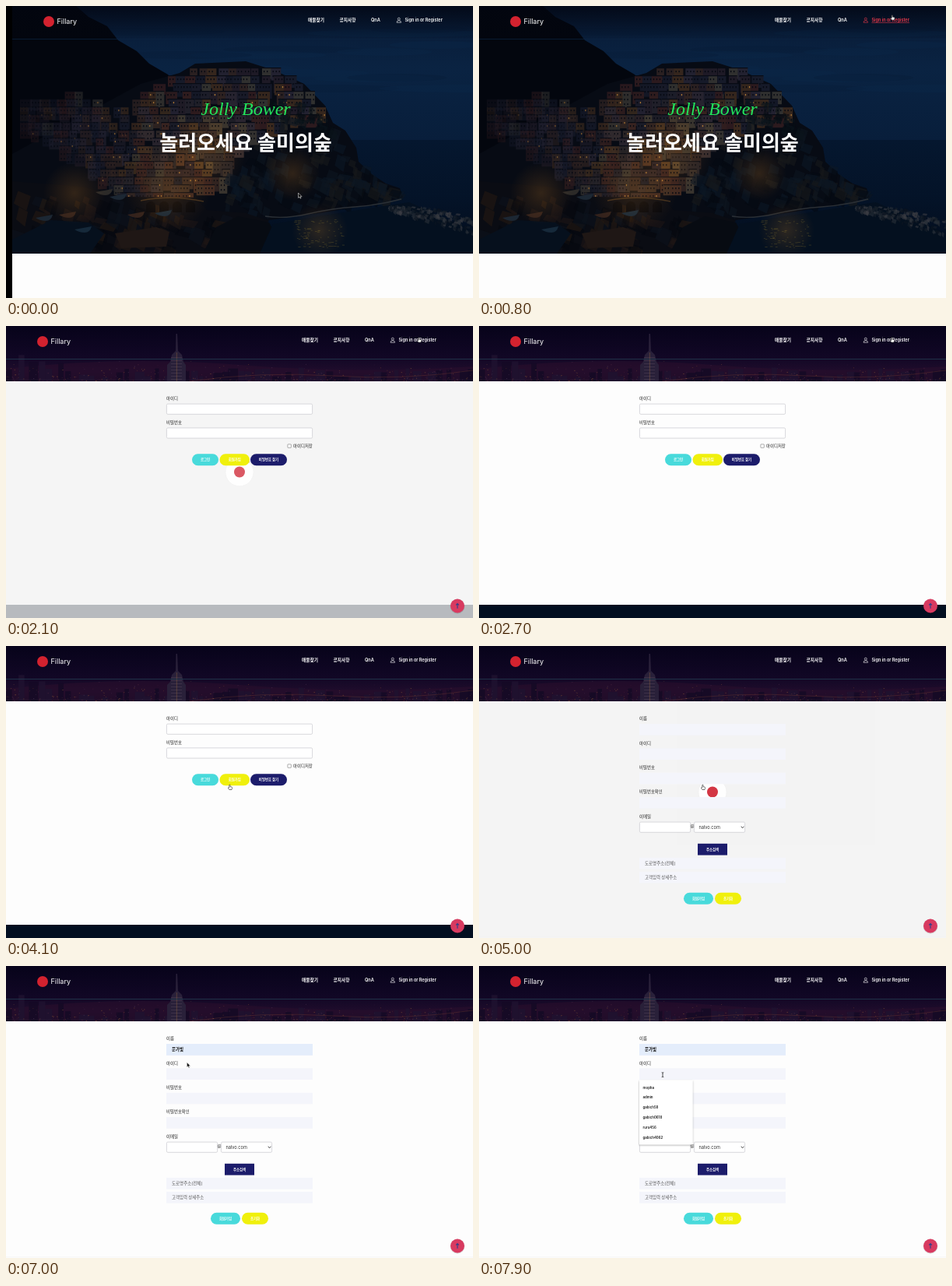
Write an HTML page that moves like this. It is 600x375 px and loops after 8000 ms.

```html
<!DOCTYPE html>
<html lang="ko">
<head>
<meta charset="utf-8">
<style>
html, body { margin: 0; width: 100%; height: 100%; overflow: hidden; background: #000; }
svg { display: block; width: 100%; height: 100%; }
text { font-family: Inter, "Noto Sans CJK KR", "Noto Sans CJK", sans-serif; white-space: pre; }
</style>
</head>
<body>
<svg id="stage" viewBox="0 0 600 375" preserveAspectRatio="none"></svg>
<script>
const LOOP = 8000;
const stage = document.getElementById('stage');

// Markup helpers
const rect = (x, y, w, h, fill, more = '') =>
  `<rect x="${x}" y="${y}" width="${w}" height="${h}" fill="${fill}" ${more}/>`;
const circle = (x, y, r, fill, more = '') => `<circle cx="${x}" cy="${y}" r="${r}" fill="${fill}" ${more}/>`;
const path = (d, fill, more = '') => `<path d="${d}" fill="${fill}" ${more}/>`;
const text = (x, y, size, fill, str, weight = 500, more = '') =>
  `<text x="${x}" y="${y}" font-size="${size}" fill="${fill}" font-weight="${weight}" ${more}>${str}</text>`;
const group = (id, inner, more = '') => `<g id="${id}" ${more}>${inner}</g>`;
const mid = 'text-anchor="middle"';

function seeded(s) {
  return () => {
    s = (s + 0x6D2B79F5) | 0;
    let v = Math.imul(s ^ (s >>> 15), 1 | s);
    v = (v + Math.imul(v ^ (v >>> 7), 61 | v)) ^ v;
    return ((v ^ (v >>> 14)) >>> 0) / 4294967296;
  };
}

// Height of a polyline at x
function along(pts, x) {
  for (let i = 1; i < pts.length; i++) {
    const [x0, y0] = pts[i - 1], [x1, y1] = pts[i];
    if (x <= x1) return y0 + (y1 - y0) * (x - x0) / (x1 - x0);
  }
  return pts[pts.length - 1][1];
}

const defs = `<defs>
<linearGradient id="sky" x1="0" y1="0" x2="0" y2="1">
  <stop offset="0" stop-color="#081a35"/><stop offset=".25" stop-color="#0a2342"/><stop offset=".54" stop-color="#081e3b"/><stop offset="1" stop-color="#06162d"/></linearGradient>
<linearGradient id="sea" x1="0" y1="0" x2="0" y2="1">
  <stop offset="0" stop-color="#05172f"/><stop offset=".5" stop-color="#041328"/><stop offset="1" stop-color="#030d1d"/></linearGradient>
<linearGradient id="shade" x1="0" y1="0" x2="0" y2="1">
  <stop offset="0" stop-color="#02050f" stop-opacity=".75"/><stop offset="1" stop-color="#02050f" stop-opacity="0"/></linearGradient>
<radialGradient id="lamp"><stop offset="0" stop-color="#c07a28" stop-opacity=".22"/>
  <stop offset="1" stop-color="#b0661c" stop-opacity="0"/></radialGradient>
<linearGradient id="night" x1="0" y1="0" x2="0" y2="1">
  <stop offset="0" stop-color="#07031a"/><stop offset=".55" stop-color="#110725"/><stop offset=".8" stop-color="#1e0c2b"/><stop offset="1" stop-color="#150a24"/></linearGradient>
<clipPath id="heroClip"><rect width="600" height="318"/></clipPath>
<clipPath id="headClip"><rect width="600" height="71"/></clipPath>
<filter id="drop" x="-10%" y="-10%" width="120%" height="125%">
  <feDropShadow dx="0" dy="1" stdDeviation="1" flood-opacity=".35"/></filter>
</defs>`;

// Houses are brightest around the lamplit square and fade into the dark hill
function village() {
  const rnd = seeded(41);
  const top = [[8, 118], [80, 108], [140, 128], [168, 98], [215, 84], [235, 72], [300, 70], [335, 80], [372, 98], [398, 128]];
  const low = [[8, 150], [90, 205], [140, 245], [225, 250], [265, 222], [300, 165], [398, 134]];
  const walls = ['#1e1a26', '#2a2021', '#161a29', '#35261d', '#222130', '#131726', '#2c1a1e', '#30302f'];
  let out = '';
  for (let y = 70; y < 250; y += 10) {
    for (let x = 10; x < 394; x += 9 + rnd() * 6) {
      const w = 9 + rnd() * 7, h = 13 + rnd() * 9;
      const color = walls[Math.floor(rnd() * walls.length)];
      if (y < along(top, x) || y > along(low, x) || rnd() < 0.12) continue;
      const glow = Math.max(0, 1 - Math.hypot(x - 235, (y - 195) * 1.3) / 130);
      const dim = Math.min(1, .3 + x / 300);
      let house = rect(x.toFixed(1), y, w.toFixed(1), h.toFixed(1), color) +
        rect(x.toFixed(1), y, w.toFixed(1), h.toFixed(1), '#7a5428', `opacity="${(glow * .55 * rnd()).toFixed(2)}"`) +
        rect(x.toFixed(1), y - 1, w.toFixed(1), 1.2, '#080b14');
      for (let k = 2; k < w - 2; k += 4)
        for (let j = 3; j < h - 4; j += 6)
          house += rect((x + k).toFixed(1), y + j, 1.3, 2.2, rnd() < .05 ? '#a87535' : '#060912');
      out += `<g opacity="${dim.toFixed(2)}">${house}</g>`;
    }
  }
  return out;
}

// Scattered facets between two outlines
function rocks(rnd, count, top, low, colors, size) {
  const x0 = top[0][0], span = top[top.length - 1][0] - x0;
  let out = '';
  for (let i = 0; i < count; i++) {
    const x = x0 + rnd() * span, a = along(top, x), y = a + rnd() * (along(low, x) - a);
    const w = size * (.4 + rnd()), h = size * (.5 + rnd());
    out += path(`M${x.toFixed(1)} ${y.toFixed(1)}l${w.toFixed(1)} ${(h / 3).toFixed(1)}l${(-w / 3).toFixed(1)} ${h.toFixed(1)}l${(-w).toFixed(1)} ${(-h / 2).toFixed(1)}z`,
      colors[i % colors.length], 'opacity=".6"');
  }
  return out;
}

function heroPhoto() {
  const rnd = seeded(7);
  let out = rect(0, 0, 600, 318, 'url(#sky)') + rect(280, 172, 320, 146, 'url(#sea)');
  // Long soft clouds
  for (let i = 0; i < 16; i++)
    out += `<ellipse cx="${(150 + rnd() * 450).toFixed(0)}" cy="${(25 + rnd() * 130).toFixed(0)}" rx="${(50 + rnd() * 70).toFixed(0)}" ry="5" fill="${i % 2 ? '#0d294b' : '#071b36'}" opacity=".3"/>`;
  out += path('M0 0H82L98 14L122 26L136 44L160 58L176 74L200 88L240 130V318H0Z', '#03060e');
  out += path('M0 190L165 100L215 86L235 74L300 71L335 82L375 100L402 128L412 150L428 160L442 182L445 200L462 216L480 228L498 234L502 246L470 254L400 265L330 275L270 318H0Z', '#070b14');
  out += village();
  // Rock faces of the headland
  out += rocks(rnd, 130, [[275, 215], [310, 180], [345, 135], [400, 140], [440, 195], [490, 236]],
    [[275, 262], [340, 258], [420, 246], [490, 242]], ['#0d1620', '#050a13', '#17191b', '#0b1724'], 12);
  out += rocks(rnd, 40, [[325, 112], [370, 118], [410, 150]], [[325, 135], [380, 150], [410, 165]], ['#0a141b', '#060d14'], 8);
  // Harbour and foreground
  out += path('M0 225L90 232L140 245L236 246L250 262L300 266L330 276L290 318H0Z', '#0a0c13');
  out += rocks(rnd, 110, [[0, 228], [140, 246], [250, 264], [335, 276]], [[0, 300], [140, 312], [335, 305]],
    ['#05080f', '#1c1615', '#0b121d', '#231913'], 14);
  for (let i = 0; i < 4; i++) out += path(`M${172 + i * 17} 265v-8a6 6 0 0 1 12 0v8z`, '#04060c');
  out += path('M165 250Q205 242 246 251', 'none', 'stroke="#3f2e1d" stroke-width="1.5"');
  out += path('M0 300L50 275L98 278L118 292L100 318H0Z', '#06101d');
  out += path('M245 318L262 284L290 270L330 278L352 318Z', '#070b12');
  out += path('M318 318L335 280L400 269L470 258L510 252L600 292V318Z', '#04101f');
  out += path('M325 270Q350 274 380 267T440 258T500 248', 'none', 'stroke="#2a2f35" stroke-width="1.3"');
  out += path('M132 292L185 284L202 290L198 309L140 311Z', '#1f1715');
  // Boats
  const boats = [[30, 272], [60, 268], [80, 287], [107, 239], [125, 245], [148, 268], [183, 266]];
  boats.forEach(([x, y], i) => {
    out += path(`M${x} ${y}l22 -4q-2 8 -9 8t-13 -4z`, ['#1c2733', '#33221c', '#16293a', '#2c2a28'][i % 4]);
  });
  // Breakwater stones
  out += rocks(rnd, 210, [[484, 255], [540, 258], [600, 274]], [[484, 260], [540, 276], [600, 294]],
    ['#2a3039', '#171f2a', '#3a3c42', '#0c1420'], 4);
  // Lamps and their glow on the water
  for (const [x, y, r] of [[200, 235, 55], [80, 240, 40], [250, 190, 50], [360, 215, 35], [395, 288, 36]])
    out += circle(x, y, r, 'url(#lamp)');
  for (let i = 0; i < 85; i++)
    out += rect((362 + rnd() * 62).toFixed(1), (274 + rnd() * 36).toFixed(1), (1 + rnd() * 3).toFixed(1), .7, '#75652c', 'opacity=".5"');
  out += rect(0, 0, 600, 45, 'url(#shade)');
  return group('photo', out, 'clip-path="url(#heroClip)"');
}

function headPhoto() {
  const rnd = seeded(19);
  let out = rect(0, 0, 600, 71, 'url(#night)');
  out += path('M0 55Q150 38 300 50T600 52V71H0Z', '#2a0f2c', 'opacity=".55"');
  // Skyline
  for (let x = 0; x < 600; x += 7 + rnd() * 12) {
    const h = x < 70 ? 14 + rnd() * 20 : 5 + rnd() * 13;
    out += rect(x.toFixed(1), (71 - h).toFixed(1), (5 + rnd() * 8).toFixed(1), h.toFixed(1), rnd() < .5 ? '#140a25' : '#1f1230', 'opacity=".85"');
  }
  // City lights thicken towards the lower edge
  for (let i = 0; i < 360; i++) {
    const x = rnd() * 600, y = 71 - 27 * rnd() * rnd();
    out += rect(x.toFixed(1), y.toFixed(1), (.6 + rnd()).toFixed(1), .7,
      ['#8a5332', '#66324a', '#59415f', '#a06a3a'][i % 4], `opacity="${(.25 + rnd() * .5).toFixed(2)}"`);
  }
  out += path('M235 71Q330 58 420 64T600 57', 'none', 'stroke="#8b4a34" stroke-width=".7" opacity=".4"');
  // Tower
  out += path('M218.5 10L220 10L221 32L226 37L228 46L231 50V71H207V50L211 46L213 37L218 32Z', '#292039');
  for (let y = 40; y < 71; y += 4) out += rect(212, y, 14, .7, '#5b4a60', 'opacity=".6"');
  out += rect(218.8, 34, 1, 37, '#84603f', 'opacity=".5"');
  return group('headPhoto', out, 'clip-path="url(#headClip)"');
}

function nav(id, line) {
  const icon = 'M494 21.2q0 -2.6 2.8 -2.6t2.8 2.6z';
  return rect(0, 42, 600, .7, line) +
    circle(47, 20, 7, '#d3222f') + text(57.5, 23, 9, '#fff', 'Fillary', 400) +
    text(380, 20.3, 5.7, '#fff', '매물찾기', 700) + text(420.5, 20.3, 5.7, '#fff', '공지사항', 700) +
    text(461, 20.2, 5.6, '#fff', 'QnA', 600) +
    group(id, `<circle cx="496.8" cy="16.6" r="1.5" fill="none" stroke="currentColor" stroke-width=".6"/>` +
      path(icon, 'none', 'stroke="currentColor" stroke-width=".6"') +
      text(504.5, 20.2, 5.5, 'currentColor', 'Sign in or Register', 600) +
      rect(504.5, 20.9, 48.5, .6, 'currentColor', `id="${id}Line" style="display:none"`), 'color="#fff"');
}

const pill = (x, y, w, fill, str, ink = '#fff') =>
  rect(x, y, w, 15, fill, 'rx="7.5"') + text(x + w / 2, y + 9.1, 4.4, ink, str, 700, mid);
const label = (y, str) => text(206, y + 2, 5.4, '#222', str);
const field = y => rect(206, y, 188, 14.7, '#f4f5fb');
const box = (x, y, w, h) => rect(x + .4, y + .4, w - .8, h - .8, '#fff', 'rx="1.5" stroke="#cfcfd3" stroke-width=".8"');

function menu(id, y, items) {
  return group(id, rect(206, y, 68.5, 82.5, '#fff', 'filter="url(#drop)"') +
    rect(206, y + 2, 68.5, 13, '#ececee', `id="${id}Hover" visibility="hidden"`) +
    items.map((s, i) => text(210.5, y + 10.8 + i * 12.8, 4.4, '#1b1b1b', s, 600)).join(''));
}

const hero = group('hero', rect(0, 0, 600, 375, '#fdfdfd') + heroPhoto() + nav('heroSign', '#0c2442') +
  text(300, 140, 24, '#22e45c', 'Jolly Bower', 400,
    mid + ' style="font-family:\'Liberation Serif\',serif;font-style:italic"') +
  text(300, 185, 26, '#fff', '놀러오세요 솔미의숲', 700, mid));

const loader = group('loader', rect(0, 0, 600, 375, '#f3f3f3') +
  circle(300, 187.7, 18, '#fff', 'stroke="#e9e9e9" stroke-width=".5"') +
  path('M287 175.2A18 18 0 0 1 313 175.2', 'none', 'stroke="#b5485a" stroke-width=".8"') +
  circle(300, 187.5, 7, '#cf2130'));

const login = group('login', label(93, '아이디') + box(206, 99.7, 188, 14) +
  label(123.7, '비밀번호') + box(206, 130.5, 188, 14) +
  rect(361.9, 151.9, 4.4, 4.4, '#fff', 'rx=".4" stroke="#777" stroke-width=".6"') +
  text(369, 156.2, 5.4, '#222', '아이디저장') +
  pill(239, 164.3, 34, '#48dadb', '로그인') + pill(274.5, 164.3, 38.5, '#f0f00c', '회원가입') +
  pill(314, 164.3, 47, '#1c1c6b', '비밀번호 찾기'));

const register = group('register', label(93, '이름') + field(100) + label(124.5, '아이디') + field(131.3) +
  label(155.8, '비밀번호') + field(162.7) + label(187, '비밀번호확인') + field(194) +
  label(218.5, '이메일') + box(206, 225.7, 66, 14) + text(271.5, 232.5, 5.5, '#333', '@', 400) +
  box(276, 225.7, 66, 14) + text(282.5, 234.7, 5.6, '#333', 'nalvo.com', 400) +
  path('M336.8 231.8l1.8 1.8l1.8 -1.8', 'none', 'stroke="#222" stroke-width=".9"') +
  rect(281, 253.8, 38, 14.8, '#1c1c6b') + text(300, 262.8, 4.4, '#fff', '주소검색', 700, mid) +
  field(271.9) + text(213, 281.2, 5.5, '#555', '도로명주소(전체)', 400) +
  field(289.9) + text(213, 299.2, 5.4, '#555', '고객입력 상세주소', 400) +
  pill(263, 316.7, 38, '#48dadb', '회원가입') + pill(303, 316.7, 34, '#f0f00c', '초기화') +
  group('filled', rect(206, 100, 188, 14.7, '#e4edfb') + text(213, 109.3, 5.5, '#111', '문가빛', 600)) +
  group('caret', rect(213.2, 104, .7, 6.5, '#222')) +
  menu('nameMenu', 115, ['문가빛', '오새론', '담당자', '루루', 'gabich4062', 'gabich58@nalvo.com']) +
  menu('idMenu', 146.7, ['mopha', 'admin', 'gabich58', 'gabich0618', 'ruru456', 'gabich4062']));

const upButton = circle(580, 360, 9.4, '#000', 'opacity=".12"') + circle(580, 359.5, 9, '#d83a60') +
  path('M580 362.8V356.6M578.2 358.4L580 356.5L581.8 358.4', 'none', 'stroke="#2a3f8c" stroke-width="1.1"');

const status = group('status', rect(0, 367.3, 200, 7.7, '#f688a8') + rect(0, 367, 200, .5, '#c9718b') +
  text(2, 372.9, 4.3, '#151515', 'maps.googleapis.com의 응답을 기다리는 중...', 600));

const edge = 'stroke="#222" stroke-width=".6" stroke-linejoin="round"';
const cursors = group('arrow', path('M0 0V6.4L1.5 5L2.5 7.2L3.5 6.7L2.6 4.7H4.6Z', '#111', 'stroke="#fff" stroke-width=".5"')) +
  group('hand', path('M-1.2 -3q.7 -.6 1.2 0V-.9L2 -.4Q2.8 0 2.6 1L2 3H-1.2L-2.7 .7Q-2.4 -.2 -1.2 .5Z', '#fff', edge)) +
  group('beam', path('M-1.3 -3Q0 -3 0 -2.2Q0 -3 1.3 -3M0 -2.2V2.2M-1.3 3Q0 3 0 2.2Q0 3 1.3 3', 'none', 'stroke="#222" stroke-width=".8"'));

stage.innerHTML = defs + hero +
  group('pages', rect(0, 0, 600, 375, '#fdfdfd') + rect(0, 373.5, 600, .8, '#f3f3f3') +
    group('foot', rect(0, 358, 600, 17, '#020e20')) + loader +
    group('inner', headPhoto() + nav('innerSign', '#234457') + login + register + upButton)) +
  status + group('cursor', cursors);

const el = {};
stage.querySelectorAll('[id]').forEach(n => el[n.id] = n);
const show = (id, on) => { el[id].style.display = on ? '' : 'none'; };
const part = (t, a, b) => Math.min(1, Math.max(0, (t - a) / (b - a)));
const swing = p => .5 - Math.cos(p * Math.PI) / 2;
const within = (t, a, b) => t >= a && t < b;

// Pointer legs: start, end, x, y
const legs = [[0, 750, 531.5, 15], [1000, 1300, 531, 18], [3000, 3800, 288, 181.5], [5000, 5750, 246, 105.7],
  [6300, 6600, 232, 122], [6900, 7400, 236, 139.7]];
// Pointer shape from each time on
const shapes = [[0, 'arrow'], [650, 'hand'], [3100, 'arrow'], [3650, 'hand'], [5150, 'arrow'],
  [5600, 'beam'], [6400, 'arrow'], [7200, 'beam']];

function draw(t) {
  const opening = t < 1500;
  const blank = within(t, 1500, 1800) || within(t, 4200, 4800);
  show('hero', opening);
  show('pages', !opening);
  show('inner', !blank);
  show('login', t < 4200);
  show('register', t >= 4800);
  show('foot', t < 4200);
  show('status', within(t, 1100, 1800) || within(t, 4200, 4500));

  el.hero.setAttribute('transform', `translate(${(8 * (1 - swing(part(t, 0, 400)))).toFixed(2)} 0)`);
  const hover = within(t, 650, 1500);
  el.heroSign.setAttribute('color', hover ? '#f03a4c' : '#fff');
  show('heroSignLine', hover);

  const fade = t < 4200 ? part(t, 1850, 2600) : part(t, 4850, 5600);
  el.loader.setAttribute('opacity', 1 - swing(fade));

  show('nameMenu', within(t, 6100, 6700));
  show('caret', within(t, 6100, 6500));
  show('filled', t >= 6700);
  show('idMenu', t >= 7700);
  el.nameMenuHover.setAttribute('visibility', within(t, 6500, 6700) ? 'visible' : 'hidden');

  let x = 375.5, y = 240;
  for (const [a, b, tx, ty] of legs) {
    const p = swing(part(t, a, b));
    x += (tx - x) * p;
    y += (ty - y) * p;
  }
  el.cursor.setAttribute('transform', `translate(${x.toFixed(2)} ${y.toFixed(2)})`);
  const shape = shapes.filter(s => s[0] <= t).pop()[1];
  for (const id of ['arrow', 'hand', 'beam']) show(id, id === shape);
}

const start = performance.now();
function tick() {
  draw((performance.now() - start) % LOOP);
  requestAnimationFrame(tick);
}
tick();
</script>
</body>
</html>
```
